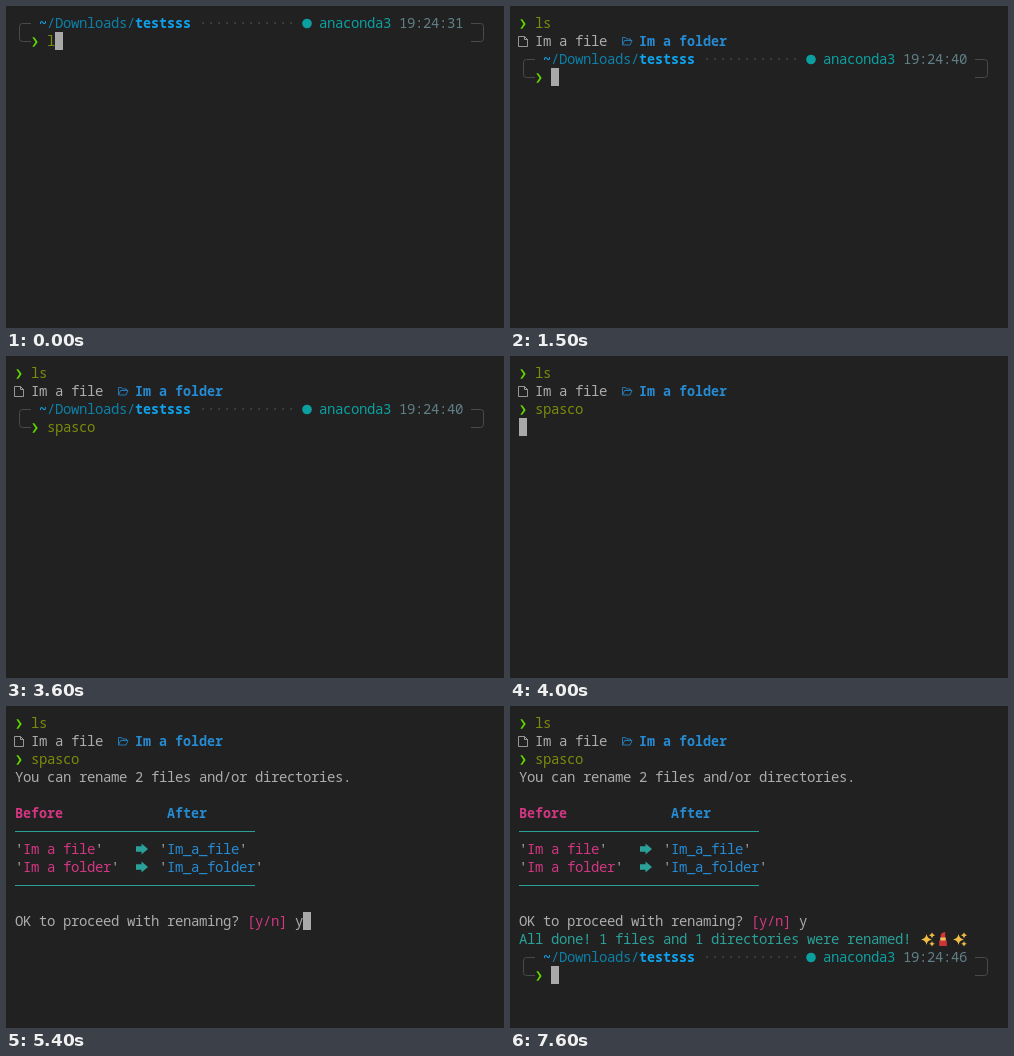
Animation of 498 by 322 pixels, one loop 8000 ms. Source, as an HTML page:

```html
<!DOCTYPE html>
<html lang="en">
<head>
<meta charset="utf-8">
<title>Terminal rename session</title>
<style>
  html, body { margin: 0; width: 100%; height: 100%; overflow: hidden; background: #212121; }
  svg { display: block; width: 498px; height: 322px; }
  text { font: 14px "Noto Sans Mono", monospace; white-space: pre; }
  .b { font-size: 13.333px; font-weight: 700; }
</style>
</head>
<body>
<svg id="stage" viewBox="0 0 498 322" xmlns="http://www.w3.org/2000/svg"></svg>
<script>
const LOOP = 8000, CELL = 8, LINE = 18, LEFT = 9, TOP = 8;
const C = {
  fg: '#acacac', cursor: '#a9a9a9', olive: '#7b8a0c', green: '#5fd700', red: '#d7302e',
  pink: '#d33682', blue: '#268bd2', teal: '#2aa198', frame: '#4a4a4a',
  path: '#0d80a8', dir: '#0fa3ee', env: '#0c9fa0', clock: '#617f86'
};
const stage = document.getElementById('stage');

const colX = col => LEFT + col * CELL;
const rowY = row => TOP + row * LINE;

// Terminal text: every character starts at its own cell.
function text(col, row, str, fill, bold) {
  const xs = [...str].map((_, i) => colX(col + i)).join(' ');
  return `<text x="${xs}" y="${rowY(row) + 14}" fill="${fill}"${bold ? ' class="b"' : ''}>${str}</text>`;
}

const shape = (x, y, d, attrs) => `<path transform="translate(${x} ${y})" d="${d}" ${attrs}/>`;
const line = (x, y, d, color, width = 1) =>
  shape(x, y, d, `fill="none" stroke="${color}" stroke-width="${width}"`);

const chevron = (col, row) =>
  shape(colX(col), rowY(row), 'M1.3 5.2H3.3L6.7 10L3.3 14.8H1.3L4.5 10Z', `fill="${C.green}"`);

const cursor = (col, row) =>
  `<rect x="${colX(col)}" y="${rowY(row)}" width="${CELL}" height="${LINE}" fill="${C.cursor}"/>`;

const command = (row, str) => chevron(0, row) + text(2, row, str, C.olive);

function prompt(row, clock) {
  const y = rowY(row) + 9.5;
  return line(0, y, 'M25 0H16.5Q13.5 0 13.5 3V15Q13.5 18 16.5 18H25', C.frame) +
    line(0, y, 'M465 0H474.5Q477.5 0 477.5 3V15Q477.5 18 474.5 18H465', C.frame) +
    text(3, row, '~', C.dir, true) +
    text(4, row, '/Downloads/', C.path) +
    text(15, row, 'testsss', C.dir, true) +
    text(23, row, '·'.repeat(12), C.frame) +
    `<circle cx="301" cy="${y}" r="4.8" fill="${C.env}"/>` +
    text(38, row, 'anaconda3', C.env) +
    text(48, row, clock, C.clock) +
    chevron(2, row + 1);
}

function listing() {
  return command(0, 'ls') +
    line(8, 30, 'M.5 .5H6.5L9.5 3.5V10.5H.5ZM6.5 .5V3.5H9.5', C.fg, 0.85) +
    text(2, 1, 'Im a file', C.fg) +
    line(112, 31, 'M.5 8V.5H3.5L4.5 2H8.5V3.5M.5 8L2.5 3.5H10L8 8Z', C.blue, 0.8) +
    text(15, 1, 'Im a folder', C.blue, true);
}

function renameRow(row, from, to) {
  const quoted = (col, str, color) =>
    text(col, row, "'", C.fg) + text(col + 1, row, str, color) + text(col + 1 + str.length, row, "'", C.fg);
  return quoted(0, from, C.pink) +
    shape(130, rowY(row) + 9, 'M0 -2.8H5.5V-5.6L12 0L5.5 5.6V2.8H0Z', `fill="${C.teal}"`) +
    quoted(18, to, C.blue);
}

function table() {
  const rule = row => line(LEFT, rowY(row) + 9.5, 'M0 0H240', C.teal);
  return text(0, 3, 'You can rename 2 files and/or directories.', C.fg) +
    text(0, 5, 'Before', C.pink, true) + text(19, 5, 'After', C.blue, true) +
    rule(6) +
    renameRow(7, 'Im a file', 'Im_a_file') +
    renameRow(8, 'Im a folder', 'Im_a_folder') +
    rule(9) +
    text(0, 11, 'OK to proceed with renaming?', C.fg) + text(29, 11, '[y/n]', C.pink);
}

function sparkles(x, y) {
  const star = (cx, cy, r) => {
    const k = r * 0.15;
    return shape(x + cx, y + cy,
      `M0 ${-r}Q${k} ${-k} ${r} 0Q${k} ${k} 0 ${r}Q${-k} ${k} ${-r} 0Q${-k} ${-k} 0 ${-r}Z`,
      'fill="#f0bc45"');
  };
  return star(5.5, 7.5, 5.4) + star(11, 3.2, 3) + star(11, 11.8, 2.8);
}

function lipstick(x, y) {
  return shape(x, y, 'M3.8 6V2.5Q5 .3 8.2 0V6Z', 'fill="#d8362f"') +
    shape(x, y, 'M3.2 5.5H8.8V9H3.2Z', 'fill="#efc163"') +
    shape(x, y, 'M2.2 8.5H9.8V14H2.2Z', 'fill="#cf3434"');
}

const done = () =>
  text(0, 12, 'All done! 1 files and 1 directories were renamed!', C.teal) +
  sparkles(411, 226) + lipstick(427, 226) + sparkles(443, 226);

// Keystrokes: time and number of letters on the line.
const typed = [[2000, 1], [2100, 2], [2400, 3], [2600, 4], [2800, 5], [3100, 6]];
const blinks = [[900, 1500], [3600, 4000], [4600, 5200], [6000, 6400], [7000, 7600]];

function screen(t) {
  const mark = (col, row) => blinks.some(([off, on]) => t >= off && t < on) ? '' : cursor(col, row);
  if (t < 400) {
    const word = t < 100 ? 'l' : 'ls';
    return prompt(0, '19:24:31') + text(4, 1, word, C.olive) + mark(4 + word.length, 1);
  }
  if (t < 4000) {
    const n = typed.filter(([at]) => t >= at).length;
    const known = n === 6;
    return listing() + prompt(2, '19:24:40') +
      text(4, 3, 'spasco'.slice(0, n), known ? C.olive : C.red, !known) + mark(4 + n, 3);
  }
  const ran = listing() + command(2, 'spasco');
  if (t < 4100) return ran + mark(0, 3);
  if (t < 5400) return ran + table() + mark(35, 11);
  const answered = ran + table() + text(35, 11, 'y', C.fg);
  if (t < 6400) return answered + mark(36, 11);
  return answered + done() + prompt(13, '19:24:46') + mark(4, 14);
}

let shown = '';
function draw() {
  const next = screen(performance.now() % LOOP);
  if (next !== shown) stage.innerHTML = shown = next;
  requestAnimationFrame(draw);
}
draw();
</script>
</body>
</html>
```
